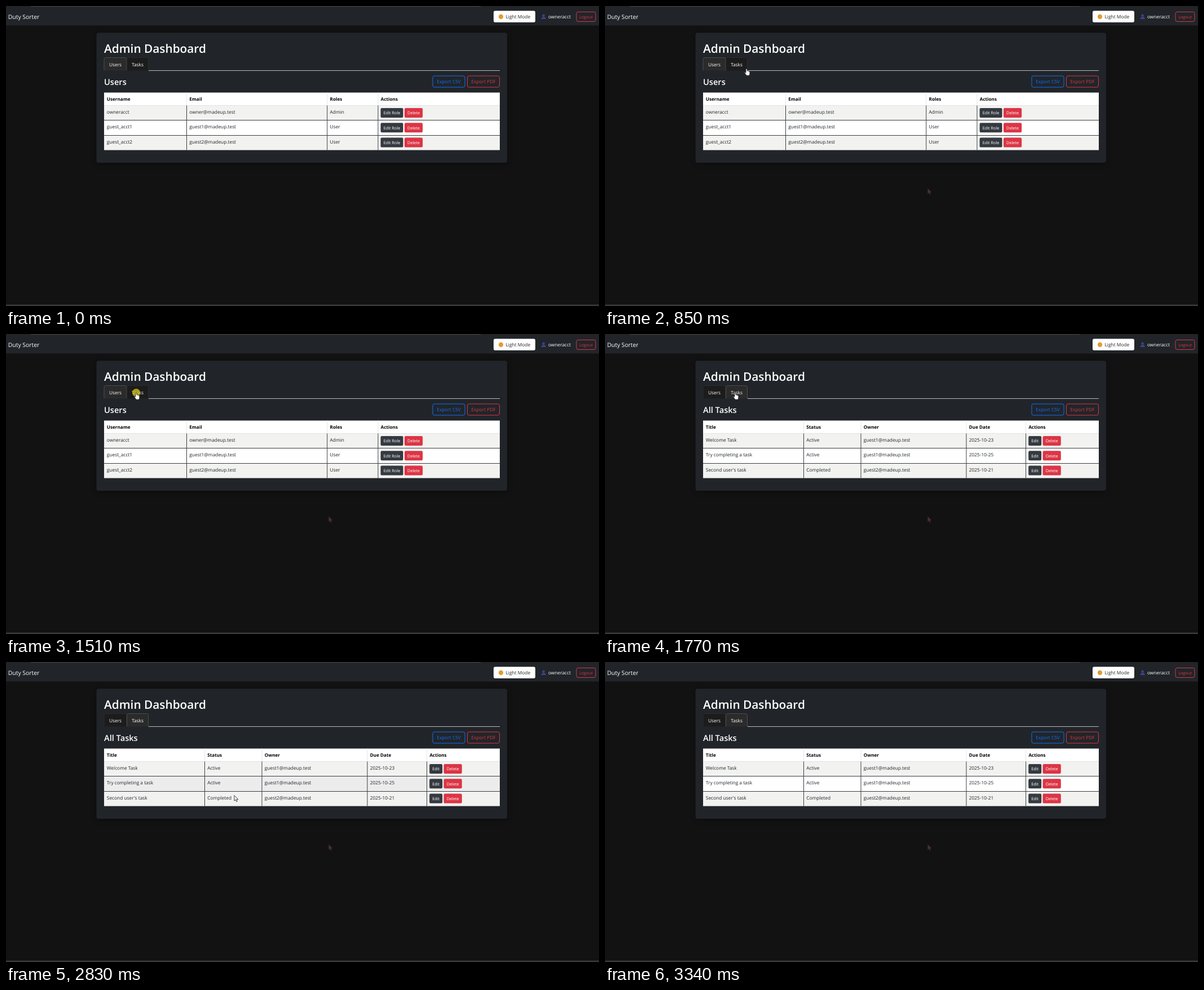
An HTML page for the animation above (4490 ms loop, 1052 by 532 pixels).

```html
<!DOCTYPE html>
<html lang="en">
<head>
<meta charset="utf-8">
<title>Admin Dashboard</title>
<style>
  html, body { margin: 0; width: 100%; height: 100%; overflow: hidden; background: #121212; }
  svg { display: block; }
  text {
    font: 8.35px "Open Sans", "Noto Sans", sans-serif;
    fill: #fff; text-rendering: geometricPrecision; white-space: pre;
  }
  .h1 { font-size: 20.8px; font-weight: 600; }
  .h2 { font-size: 14.6px; font-weight: 600; }
  .brand { font-size: 10.4px; }
  .small { font-size: 7.3px; }
  .th { font-size: 8.15px; font-weight: 700; fill: #000; }
  .td { fill: #212529; }
  .mid { text-anchor: middle; }
  .tab { fill: #1c1c1c; stroke: #2d2d2d; }
  .tab.on { fill: #2b2b2b; stroke: #4a4d50; }
  .card { filter: drop-shadow(0 2px 4px rgba(0, 0, 0, .35)); }
</style>
</head>
<body>
<svg id="stage" width="1052" height="532" viewBox="0 0 1052 532"></svg>
<script>
const LOOP = 4490, SWITCH = 1660;
const TOP = 176.5, ROW = 26.35, LEFT = 174, RIGHT = 876;
const BLUE = '#0d6efd', RED = '#dc3545', DARK = '#343a40';

const text = (x, y, s, cls = '') => `<text x="${x}" y="${y}" class="${cls}">${s}</text>`;
const rect = (x, y, w, h, fill, extra = '') =>
  `<rect x="${x}" y="${y}" width="${w}" height="${h}" fill="${fill}" ${extra}/>`;
const line = (x1, y1, x2, y2, color) =>
  `<path d="M${x1} ${y1}L${x2} ${y2}" stroke="${color}"/>`;
const outline = (x, y, w, h, color, label, cls = '') =>
  rect(x, y, w, h, 'none', `rx="3" stroke="${color}"`) +
  `<text x="${x + w / 2}" y="${y + h / 2 + 3}" class="mid ${cls}" style="fill:${color}">${label}</text>`;
const button = (x, y, w, color, label) =>
  rect(x, y, w, 17, color, 'rx="2.2"') + text(x + w / 2, y + 11.3, label, 'mid small');
const tab = (id, x, w, label) =>
  `<path id="${id}" class="tab" d="M${x} 114.5V94.5q0 -3 3 -3h${w - 6}q3 0 3 3v20"/>` +
  text(x + w / 2, 106.5, label, 'mid');

// A page: heading plus table; the last column holds two buttons.
function page(id, title, cols, heads, rows, editLabel, editWidth) {
  const last = cols[cols.length - 1];
  let s = text(LEFT, 140, title, 'h2') + rect(LEFT, 153.5, RIGHT - LEFT, 23, '#fff');
  rows.forEach((row, i) => {
    const y = TOP + i * ROW;
    s += rect(LEFT, y, RIGHT - LEFT, ROW, i % 2 ? '#fff' : '#f2f2f0', 'class="row"');
    row.forEach((cell, k) => s += text(cols[k] + 4.8, y + 14.3, cell, 'td'));
    s += button(last + 4.6, y + 4.4, editWidth, DARK, editLabel) +
      button(last + 7 + editWidth, y + 4.4, 32.2, RED, 'Delete');
    if (i) s += line(LEFT, Math.floor(y) + .5, RIGHT, Math.floor(y) + .5, '#3a3d40');
  });
  s += line(LEFT, 176.5, RIGHT, 176.5, '#dee2e6');
  cols.forEach((x, k) => {
    if (k) s += line(x, 153.5, x, TOP, '#e3e6e9') + line(x, TOP, x, 255.5, '#3a3d40');
    s += text(x + 4.8, 168.2, heads[k], 'th');
  });
  return `<g id="${id}">${s}</g>`;
}

const ARROW = 'M0 0V9.6L2.2 7.6L3.8 11L5.4 10.3L3.9 7H6.8Z';
const HAND = 'M-1.1 .8Q0 -.8 1.1 .8V4Q2.3 3.3 2.9 4.4Q4 3.8 4.6 5Q5.8 4.6 5.9 6V9' +
  'Q5.8 10.6 4.8 12.2H-.2Q-1.2 10.4 -3 8Q-3.8 6.4 -2.5 6.4L-1.1 7.4Z';

const stage = document.getElementById('stage');
stage.innerHTML =
  rect(0, 0, 1052, 532, '#121212') +
  rect(0, 0, 1052, 3, '#222325') + rect(44, 0, 798, 1.5, '#3d3d3d') +
  rect(0, 3, 1052, 31.5, '#212529') + rect(0, 529.5, 1052, 2.5, '#3a3a3a') +
  text(3.8, 23, 'Duty Sorter', 'brand') +
  rect(865, 8.5, 74, 20.5, '#fff', 'rx="3"') +
  '<circle cx="878" cy="19" r="4.2" fill="#e39b32"/>' +
  text(886.5, 22, 'Light Mode', 'td') +
  '<path d="M949.5 23q0 -3.6 4.2 -3.6t4.2 3.6z" fill="#3b4590"/>' +
  '<circle cx="953.6" cy="17" r="2.3" fill="#3b4590"/>' +
  text(962, 22, 'owneracct') +
  outline(1012, 10.5, 34, 17, RED, 'Logout', 'small') +
  rect(160.5, 47.5, 728.5, 230.5, '#212529', 'rx="4" class="card"') +
  text(LEFT, 82.5, 'Admin Dashboard', 'h1') +
  line(253, 114.5, RIGHT, 114.5, '#b9bdc1') +
  tab('usersTab', 174, 40, 'Users') + tab('tasksTab', 214.5, 38, 'Tasks') +
  outline(757, 124, 57, 20, BLUE, 'Export CSV') +
  outline(818.5, 124, 57, 20, RED, 'Export PDF') +
  page('users', 'Users', [174, 320.5, 569.8, 660], ['Username', 'Email', 'Roles', 'Actions'], [
    ['owneracct', 'owner@madeup.test', 'Admin'],
    ['guest_acct1', 'guest1@madeup.test', 'User'],
    ['guest_acct2', 'guest2@madeup.test', 'User']
  ], 'Edit Role', 40) +
  page('tasks', 'All Tasks', [174, 352.5, 454, 641, 746.6],
    ['Title', 'Status', 'Owner', 'Due Date', 'Actions'], [
    ['Welcome Task', 'Active', 'guest1@madeup.test', '2025-10-23'],
    ['Try completing a task', 'Active', 'guest1@madeup.test', '2025-10-25'],
    ['Second user\'s task', 'Completed', 'guest2@madeup.test', '2025-10-21']
  ], 'Edit', 23) +
  `<path id="trace" d="${ARROW}" transform="translate(572.5 323.5)" fill="#4b2f31"/>` +
  '<circle id="click" cx="231" cy="104" fill="#d2bd12"/>' +
  '<path id="pointer" fill="#fff" stroke="#111" stroke-width=".8" stroke-linejoin="round"/>';

const el = id => document.getElementById(id);
const show = (node, on) => node.style.display = on ? '' : 'none';
const rowsOf = id => [...el(id).querySelectorAll('.row')];
const users = rowsOf('users'), tasks = rowsOf('tasks');
const baseFill = i => i % 2 ? '#fff' : '#f2f2f0';

// Pointer tip: time, x, y
const path = [
  [350, 991, 507], [500, 573, 323], [650, 370, 196], [750, 288, 136], [850, 251, 111],
  [900, 249, 110], [1110, 231, 104], [2618, 231, 104], [2670, 247, 104.5],
  [2825, 405.5, 237], [3185, 762, 425], [3288, 896, 490]
];

function tipAt(t) {
  const n = path.findIndex(p => p[0] > t);
  if (n < 0) return path[path.length - 1].slice(1);
  if (!n) return path[0].slice(1);
  const a = path[n - 1], b = path[n], f = (t - a[0]) / (b[0] - a[0]);
  return [a[1] + (b[1] - a[1]) * f, a[2] + (b[2] - a[2]) * f];
}

function sample(t) {
  const [start, step] = t < 900 ? [350, 50] : t < 2670 ? [900, 52.5] : [2670, 51.5];
  return start + Math.floor((t - start) / step) * step;
}

function draw(t) {
  const onTasks = t >= SWITCH, visible = t >= 350 && t < 3340;
  show(el('users'), !onTasks);
  show(el('tasks'), onTasks);
  el('usersTab').classList.toggle('on', !onTasks);
  el('tasksTab').classList.toggle('on', onTasks);

  const now = sample(t), [x, y] = tipAt(now);
  const pointer = el('pointer');
  show(pointer, visible);
  pointer.setAttribute('d', y < 114.5 ? HAND : ARROW);
  pointer.setAttribute('transform', `translate(${x} ${y})`);

  // Row hover trails the pointer slightly.
  const [hx, hy] = tipAt(now - 20);
  const hot = visible && hx > LEFT && hx < RIGHT ? Math.floor((hy - TOP) / ROW) : -1;
  (onTasks ? tasks : users).forEach((r, i) =>
    r.setAttribute('fill', i === hot ? '#ececec' : baseFill(i)));

  show(el('trace'), t >= 550);
  const k = Math.max(0, (t - 1610) / 160), click = el('click');
  show(click, t >= 1510 && t < 1770);
  click.setAttribute('r', 7 + 3 * k);
  click.setAttribute('opacity', Math.max(0, .8 * (1 - k)));
}

const begin = performance.now();
(function frame() {
  draw((performance.now() - begin) % LOOP);
  requestAnimationFrame(frame);
})();
</script>
</body>
</html>
```
